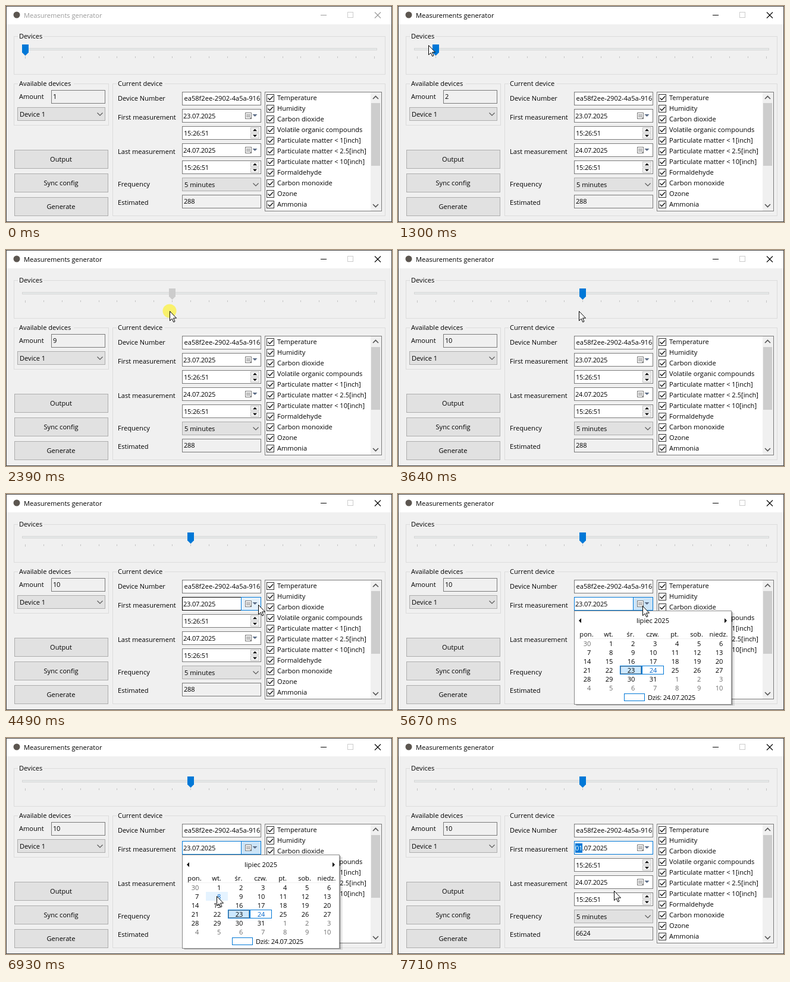
Recreate the animation shown at these times as an HTML page with a canvas. Size 649x365 px, loop 8 s.

```html
<!DOCTYPE html>
<html lang="en">
<head>
<meta charset="utf-8">
<title>Measurements generator</title>
<style>
html, body { margin: 0; width: 100%; height: 100%; overflow: hidden; background: #f0f0f0; }
canvas { display: block; }
</style>
</head>
<body>
<canvas id="stage" width="649" height="365"></canvas>
<script>
const ctx = document.getElementById('stage').getContext('2d');
const LOOP = 8000;
const BLUE = '#0078d7', EDGE = '#7a7a7a', FACE = '#f0f0f0';

// Pointer stops: time, x, y
const STOPS = [
  [370, 230, 364], [800, 32, 72], [880, 32, 72], [1160, 51, 66], [1290, 51, 66],
  [1400, 62, 70], [1970, 168, 95], [2010, 168, 95], [2390, 275, 103], [2760, 275, 103],
  [3180, 304, 101], [3380, 304, 103], [3780, 304, 103], [4350, 429, 205],
  [4490, 424, 187], [4620, 418, 162], [4790, 412, 235], [4920, 411, 189],
  [5670, 411, 189], [5790, 407, 213], [6170, 325, 295], [6470, 325, 295], [7140, 363, 258]
];
const PRESSES = [[820, 1150], [1400, 3640], [5100, 5230], [7470, 7540]];
const OPEN = 5170, PICK = 7540, CLOSE = 7710;

const SENSORS = ['Temperature', 'Humidity', 'Carbon dioxide', 'Volatile organic compounds',
  'Particulate matter < 1[inch]', 'Particulate matter < 2.5[inch]', 'Particulate matter < 10[inch]',
  'Formaldehyde', 'Carbon monoxide', 'Ozone', 'Ammonia'];
const WEEK = ['pon.', 'wt.', 'śr.', 'czw.', 'pt.', 'sob.', 'niedz.'];

function pointerAt(t) {
  let i = STOPS.findIndex(s => s[0] > t);
  if (i < 0) i = STOPS.length;
  const a = STOPS[Math.max(i - 1, 0)], b = STOPS[i] || a;
  const k = b[0] > a[0] ? Math.max(0, (t - a[0]) / (b[0] - a[0])) : 0;
  const e = k * k * (3 - 2 * k);
  return { x: Math.round(a[1] + (b[1] - a[1]) * e), y: Math.round(a[2] + (b[2] - a[2]) * e) };
}

function box(x, y, x2, y2, fill, edge) {
  ctx.fillStyle = fill;
  if (fill) ctx.fillRect(x, y, x2 - x, y2 - y);
  if (!edge) return;
  ctx.strokeStyle = edge;
  ctx.lineWidth = 1;
  ctx.strokeRect(x + .5, y + .5, x2 - x - 1, y2 - y - 1);
}

function text(s, x, y, color = '#000', align = 'left', spacing = 0) {
  ctx.font = '11.1px "Open Sans", "Noto Sans", sans-serif';
  ctx.letterSpacing = spacing + 'px';
  ctx.textAlign = align;
  ctx.fillStyle = color;
  ctx.fillText(s, x, y);
}

const number = (s, x, y, color, align) => text(s, x, y, color, align, -.25);

function line(color, width, ...p) {
  ctx.strokeStyle = color;
  ctx.lineWidth = width;
  trace(p);
  ctx.stroke();
}

function shape(color, ...p) {
  ctx.fillStyle = color;
  trace(p);
  ctx.fill();
}

function trace(p) {
  ctx.beginPath();
  for (let i = 0; i < p.length; i += 2) ctx.lineTo(p[i], p[i + 1]);
}

const chevron = (x, y, dir, color = '#555', width = 1.1) =>
  line(color, width, x - 4.5, y - 2 * dir, x, y + 2.5 * dir, x + 4.5, y - 2 * dir);

const triangle = (x, y, r, dir, color) =>
  shape(color, x - r, y - r / 2 * dir, x + r, y - r / 2 * dir, x, y + r / 2 * dir);

function group(label, x, y, x2, y2, gap) {
  box(x, y, x2, y2, null, '#dcdcdc');
  box(x + 7, y, x + 9 + gap, y + 1, FACE);
  text(label, x + 9, y + 4);
}

function combo(label, x, y, x2) {
  box(x, y, x2, y + 23, '#e1e1e1', '#adadad');
  text(label, x + 4, y + 16);
  chevron(x2 - 9, y + 11.5, 1);
}

function titleBar(active) {
  const ink = active ? '#000' : '#999';
  box(0, 0, 649, 31, '#fff');
  ctx.fillStyle = '#5c5650';
  ctx.beginPath();
  ctx.arc(18, 15, 5.5, 0, 7);
  ctx.fill();
  text('Measurements generator', 30, 20, ink);
  line(ink, 1, 529, 15.5, 539, 15.5);
  box(574, 10, 584, 20, null, '#ccc');
  line(ink, 1.1, 620, 10.5, 630, 20.5);
  line(ink, 1.1, 630, 10.5, 620, 20.5);
}

function slider(value, pressed) {
  group('Devices', 13, 51, 638, 116, 41);
  box(27, 71, 624, 75, '#e7eaea', '#d6d6d6');
  const tick = v => Math.round(32 + (v - 1) * 587 / 19);
  for (let v = 1; v <= 20; v++) box(tick(v), 85, tick(v) + 1, v % 19 == 1 ? 89 : 88, '#c4c4c4');
  const x = tick(value) + .5;
  shape(pressed ? '#ccc' : BLUE, x - 5.5, 65, x + 5.5, 65, x + 5.5, 78.5, x, 84, x - 5.5, 78.5);
}

function field(y, pos, fill = '#fff', edge) {
  const hover = pos && pos.x >= 296 && pos.x < 429 && pos.y >= y && pos.y < y + 23;
  box(296, y, 429, y + 23, fill, edge || (hover ? '#000' : EDGE));
  return hover;
}

function dateField(y, value, pos, state) {
  const hover = field(y, pos, '#fff', state && BLUE);
  if (state == 'open') box(395, y, 429, y + 23, '#cce4f7', BLUE);
  else if (hover && pos.x >= 395) box(395, y, 429, y + 23, '#e5f1fb', BLUE);
  if (state == 'edit') {
    box(298, y + 4, 310, y + 20, BLUE);
    number(value.slice(0, 2), 298, y + 16, '#fff');
    number(value.slice(2), 310, y + 16);
  } else number(value, 298, y + 16);
  box(402, y + 6, 413, y + 17, '#fff', '#777');
  for (let i = 0; i < 3; i++) line('#888', 1, 404, y + 9.5 + i * 2, 411, y + 9.5 + i * 2);
  shape('#777', 413, y + 13, 413, y + 17, 409, y + 17);
  triangle(418.5, y + 11, 4, 1, '#5a6b85');
}

function timeField(y, pos) {
  field(y, pos);
  number('15:26:51', 299, y + 16);
  for (const [dy, dir] of [[2, -1], [12, 1]]) {
    box(411, y + dy, 426, y + dy + 9, FACE, '#c4c4c4');
    triangle(418.5, y + dy + 4.5, 3.5, dir, '#000');
  }
}

function sensorList() {
  box(435, 145, 632, 347, '#fff', EDGE);
  SENSORS.forEach((name, i) => {
    const y = 149 + i * 18;
    box(438, y, 451, y + 13, '#fff', '#333');
    line('#111', 1.4, 440.5, y + 6.5, 443.5, y + 9.5, 449, y + 3.5);
    text(name, 456, y + 10);
  });
  box(613, 146, 631, 346, FACE);
  box(614, 164, 629, 270, '#cdcdcd');
  chevron(621.5, 155, -1, '#555', 1.6);
  chevron(621.5, 337, 1, '#555', 1.6);
}

function calendar(pos, chosen) {
  box(300, 201, 566, 358, 'rgba(0,0,0,.08)');
  box(299, 199, 563, 357, 'rgba(0,0,0,.25)');
  box(296, 197, 561, 356, '#fff', '#888');
  shape('#000', 308, 210, 308, 218, 304, 214);
  shape('#000', 549, 210, 549, 218, 553, 214);
  const onTitle = pos.x >= 401 && pos.x < 456 && pos.y >= 207 && pos.y < 222;
  text('lipiec 2025', 428.5, 218, onTitle ? '#0066cc' : '#000', 'center');
  WEEK.forEach((day, i) => text(day, 317 + i * 37, 241, '#000', 'center'));
  box(303, 244, 554, 245, '#f0f0f0');

  const col = Math.floor((pos.x - 299) / 37), row = Math.floor((pos.y - 245) / 15);
  for (let i = 0; i < 42; i++) {
    const x = 299 + i % 7 * 37, y = 245 + Math.floor(i / 7) * 15;
    const hover = i == row * 7 + col && row >= 0;
    const today = i == 24;
    if (i == chosen) {
      box(x, y, x + 37, y + 15, '#cce8ff', BLUE);
      ctx.setLineDash([1, 1]);
      box(x + 1, y + 1, x + 36, y + 14, null, '#333');
      ctx.setLineDash([]);
    } else if (hover || today) box(x, y, x + 37, y + 15, hover ? '#e5f3ff' : '#fff', today && BLUE);
    const inMonth = i > 0 && i < 32;
    const day = i == 0 ? 30 : inMonth ? i : i - 31;
    number(day, x + 25, y + 12, hover || today ? '#0066cc' : inMonth ? '#000' : '#6d6d6d', 'right');
  }
  box(380, 337, 415, 350, '#fff', BLUE);
  number('Dziś: 24.07.2025', 420, 348);
}

function pointer({ x, y }, pressed) {
  if (pressed) {
    ctx.fillStyle = 'rgba(255,242,20,.6)';
    ctx.beginPath();
    ctx.arc(x, y, 11.5, 0, 7);
    ctx.fill();
  }
  ctx.save();
  ctx.translate(x + .5, y + .5);
  const outline = [0, 0, 0, 16, 3.7, 12.6, 6.2, 18.3, 8.5, 17.3, 6, 11.6, 11, 11.6, 0, 0];
  shape('#fff', ...outline);
  line('#000', 1, ...outline);
  ctx.restore();
}

function draw(t) {
  const pos = pointerAt(t);
  const pressed = PRESSES.some(([a, b]) => t >= a && t < b);
  const dragging = pressed && t < 4000;
  const open = t >= OPEN && t < CLOSE;
  const hover = t >= 3640 && !open ? pos : null;
  const value = t < 880 ? 1 : t < 1400 ? Math.round((pos.x - 32) / 30.9) + 1
    : Math.round((Math.min(pos.x, 304) - 32) / 30.9) + 1;
  const devices = t >= 3180 ? 10 : value;

  box(0, 0, 649, 365, FACE);
  titleBar(t >= 820);
  slider(devices, dragging);

  group('Available devices', 13, 131, 173, 202, 92);
  text('Amount', 22, 157);
  box(76, 142, 167, 165, FACE, EDGE);
  number(devices, 79, 157);
  combo('Device 1', 19, 171, 167);
  ['Output', 'Sync config', 'Generate'].forEach((label, i) => {
    const y = 243 + i * 40;
    box(14, y, 172, y + 32, '#e1e1e1', '#adadad');
    text(label, 92.5, y + 20, '#000', 'center');
  });

  group('Current device', 179, 131, 638, 355, 79);
  text('Device Number', 188, 160);
  text('First measurement', 188, 192);
  text('Last measurement', 188, 250);
  text('Frequency', 188, 305);
  text('Estimated', 188, 336);
  field(145, hover);
  ctx.save();
  ctx.beginPath();
  ctx.rect(297, 146, 130, 21);
  ctx.clip();
  text('ea58f2ee-2902-4a5a-916', 299.5, 160);
  ctx.restore();
  dateField(174, t < PICK ? '23.07.2025' : '01.07.2025', hover,
    t >= CLOSE ? 'edit' : t >= 5100 ? 'open' : '');
  timeField(203, hover);
  dateField(232, '24.07.2025', hover);
  timeField(261, hover);
  combo('5 minutes', 296, 290, 429);
  field(319, null, FACE);
  number(t < CLOSE ? '288' : '6624', 299, 334);
  sensorList();

  if (open) calendar(pos, t < PICK ? 23 : 1);
  box(0, 0, 649, 365, null, '#444');
  if (t >= 370) pointer(pos, pressed);
}

function tick() {
  draw(performance.now() % LOOP);
  requestAnimationFrame(tick);
}
tick();
</script>
</body>
</html>
```
